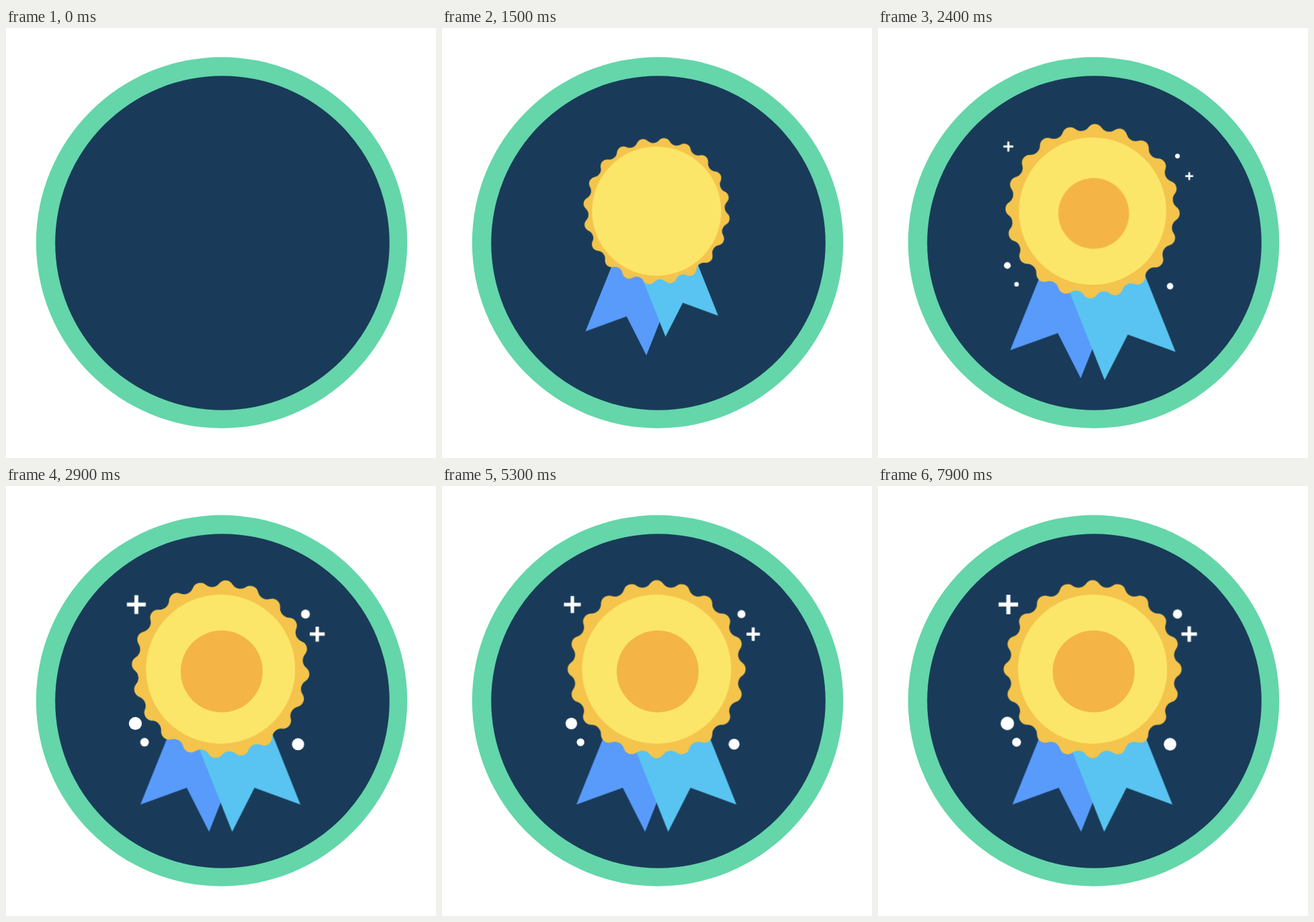
Write an HTML page that moves like this. It is 640 px wide and 640 px high and loops after 8000 ms.

```html
<!DOCTYPE html>
<html lang="en">
<head>
<meta charset="utf-8">
<title>Award badge</title>
<style>
  html, body { margin: 0; width: 100%; height: 100%; overflow: hidden; background: #fff; }
  svg { display: block; width: 100%; height: 100%; }

  .anim { animation: 8s linear infinite both; }
  .face { animation-name: face; }
  .rim { animation-name: rim; }
  .spin { animation-name: spin; }
  .mark { animation-name: mark; }
  .back { animation-name: back; }
  .front { animation-name: front; }
  .spark { animation-name: spark; }

  @keyframes face {
    0% { transform: scale(0); animation-timing-function: cubic-bezier(.38, 0, .035, 1); }
    36.25%, 100% { transform: scale(1); }
  }
  @keyframes rim {
    0%, 1.75% { transform: scale(0); animation-timing-function: cubic-bezier(.38, 0, .035, 1); }
    38%, 100% { transform: scale(1); }
  }
  @keyframes spin {
    0% { transform: rotate(360deg); animation-timing-function: cubic-bezier(.205, 0, .27, 1); }
    41.25%, 100% { transform: rotate(0deg); }
  }
  @keyframes mark {
    0%, 23.25% { transform: scale(0); animation-timing-function: cubic-bezier(.38, 0, .1, 1); }
    35.75%, 100% { transform: scale(1); }
  }
  /* Ribbons grow past full size, then settle; the front one trails. */
  @keyframes back {
    0%, 7.5% { transform: scale(0); animation-timing-function: cubic-bezier(.33, 0, .12, 1); }
    28.75% { transform: scale(1.04); animation-timing-function: ease-in-out; }
    32%, 100% { transform: scale(1); }
  }
  @keyframes front {
    0%, 9.75% { transform: scale(0); animation-timing-function: cubic-bezier(.33, 0, .12, 1); }
    31% { transform: scale(1.04); animation-timing-function: ease-in-out; }
    34%, 100% { transform: scale(1); }
  }
  @keyframes spark {
    0%, 25% { transform: scale(0); animation-timing-function: cubic-bezier(.3, 0, .3, 1); }
    39.125%, 59.125%, 79.125% { transform: scale(1.2); animation-timing-function: cubic-bezier(.37, 0, .63, 1); }
    49.125%, 69.125%, 89.125% { transform: scale(1); animation-timing-function: cubic-bezier(.37, 0, .63, 1); }
    99.125%, 100% { transform: scale(1.2); }
  }
</style>
</head>
<body>
<svg viewBox="0 0 640 640">
  <circle cx="321" cy="319.5" r="276.2" fill="#64d6aa"/>
  <circle cx="322" cy="320" r="248.8" fill="#193b59"/>

  <g transform="translate(319.4 272.6)">
    <path class="anim back" fill="#599bfa" d="M-119.4 201.6L-50.4 176.6L-17.2 242L68 28H-49.5Z"/>
    <path class="anim front" fill="#59c4f1" d="M118.8 201.6L50.4 176.6L17.2 242L-68 28H49.5Z"/>
    <g class="anim rim"><path id="scallop" class="anim spin" fill="#f4c44c"/></g>
    <circle class="anim face" r="111" fill="#fbe66a"/>
  </g>

  <g transform="translate(321 276)"><circle class="anim mark" r="61" fill="#f4b546"/></g>

  <g id="sparks" fill="#fff" stroke="#fff" stroke-width="0"></g>
</svg>
<script>
  // Rim outline: alternating outward and inward arcs around a circle.
  const bumps = 20, radius = 127.5;
  const rimPoint = i => {
    const a = (i - 0.5) * Math.PI / bumps;
    return `${(radius * Math.sin(a)).toFixed(2)} ${(-radius * Math.cos(a)).toFixed(2)}`;
  };
  let outline = `M${rimPoint(0)}`;
  for (let i = 0; i < bumps * 2; i++) {
    outline += i % 2 ? `A14.2 14.2 0 0 0 ${rimPoint(i + 1)}` : `A12 12 0 0 1 ${rimPoint(i + 1)}`;
  }
  document.getElementById('scallop').setAttribute('d', outline + 'Z');

  const place = (x, y, shape) => `<g transform="translate(${x} ${y})">${shape}</g>`;
  const dot = (x, y, r) => place(x, y, `<circle class="anim spark" r="${r}"/>`);
  const plus = (x, y, h, w) =>
    place(x, y, `<path class="anim spark" stroke-width="${w}" d="M${-h} 0H${h}M0 ${-h}V${h}"/>`);

  document.getElementById('sparks').innerHTML =
    plus(194, 176.4, 12.1, 5) + plus(463.2, 220.4, 9.6, 4.3) +
    dot(192.5, 353.4, 8.3) + dot(206.2, 381.4, 5.5) +
    dot(434.7, 384.3, 7.8) + dot(445.7, 190.6, 5.7);
</script>
</body>
</html>
```
